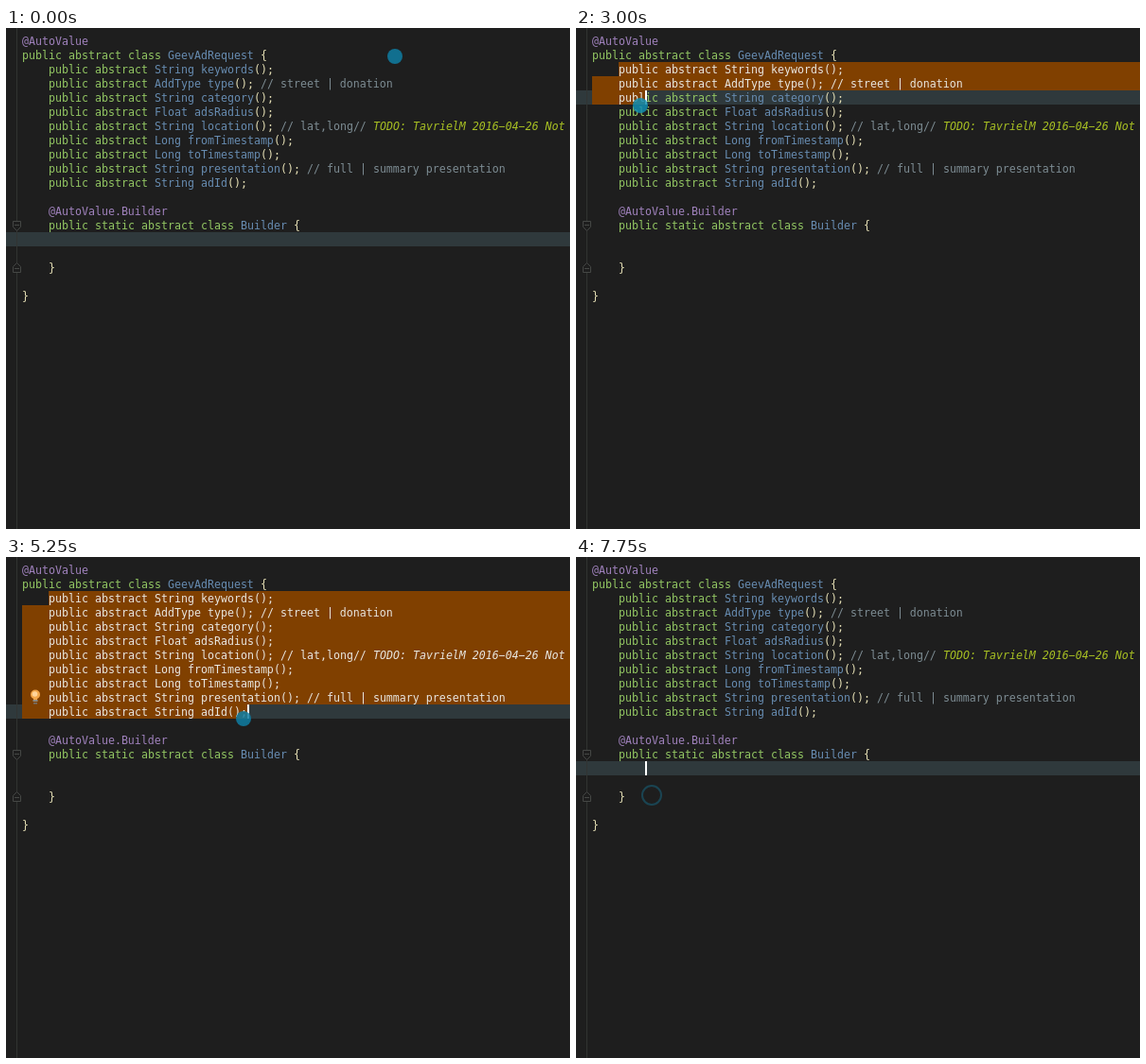
Animation of 596 by 530 pixels, one loop 8000 ms. Source, as an HTML page with a canvas:

```html
<!DOCTYPE html>
<html lang="en">
<head>
<meta charset="utf-8">
<title>Code selection</title>
<style>
  html, body { margin: 0; width: 100%; height: 100%; overflow: hidden; background: #1e1e1e; }
  canvas { display: block; }
</style>
</head>
<body>
<canvas id="stage" width="596" height="530"></canvas>
<script>
const ctx = document.getElementById('stage').getContext('2d');
const W = 596, H = 530, LOOP = 8000;
const LEFT = 17, TOP = 6, COL = 7, ROW = 15;
const SEL_ROW = 2, SEL_COL = 4;
const FONT = '11.627px "DejaVu Sans Mono", monospace';

const C = {
  bg: '#1e1e1e', line: '#2f393c', select: '#804000', chosen: '#e8e6e0',
  keyword: '#93c763', name: '#678cb1', note: '#a082bd', comment: '#7d8c93',
  todo: '#a8c023', punct: '#e8e2b7', gutter: '#323432', fold: '#454745'
};

const code = `@AutoValue
public abstract class GeevAdRequest {
    public abstract String keywords();
    public abstract AddType type(); // street | donation
    public abstract String category();
    public abstract Float adsRadius();
    public abstract String location(); // lat,long// TODO: TavrielM 2016−04−26 Not
    public abstract Long fromTimestamp();
    public abstract Long toTimestamp();
    public abstract String presentation(); // full | summary presentation
    public abstract String adId();

    @AutoValue.Builder
    public static abstract class Builder {


    }

}`.split('\n');

// time, x, y, look
const pointer = [
  [0, 411, 30, 'dot'], [250, 130, 26, 'dot'], [500, 7, 46, 'dot'],
  [750, 41, 63, 'dot'], [1000, 47, 52, 'dot'], [1250, 40, 45, 'dot'],
  [1750, 36, 65, 'ring'], [2500, 40, 28, 'dot'], [2750, 7, 59, 'drag'],
  [3000, 68, 82, 'drag'], [3250, 134, 145, 'drag'], [3500, 223, 169, 'drag'],
  [3750, 249, 171, 'dot'], [4000, 251, 171, 'dot'], [7000, 190, 197, 'dot'],
  [7250, 104, 232, 'dot'], [7500, 84, 232, 'dot'], [7750, 80, 252, 'ring']
];

// time, row, column, visible, selecting
const caret = [
  [0, 14, 8, 0, 0], [1750, 2, 4, 1, 0], [2750, 4, 0, 1, 1],
  [3000, 4, 8, 1, 1], [3250, 7, 17, 1, 1], [3500, 10, 29, 1, 1],
  [3750, 10, 33, 1, 1], [4000, 10, 34, 1, 1], [5750, 10, 34, 0, 1],
  [6250, 10, 34, 1, 1], [7250, 10, 34, 0, 1], [7750, 14, 8, 1, 0]
];

const colX = c => LEFT + c * COL;
const rowY = r => TOP + r * ROW;
const at = (track, t) => track.findLast(k => k[0] <= t);

function colorOf(token) {
  if (token.startsWith('TODO')) return C.todo;
  if (token.startsWith('//')) return C.comment;
  if (token[0] === '@') return C.note;
  if (/^(public|abstract|static|class)$/.test(token)) return C.keyword;
  return /^\w/.test(token) ? C.name : C.punct;
}

const pattern = /TODO.*|\/\/.*?(?=TODO|$)|@[\w.]+|\w+|[^\w\s]+/g;
const tokens = code.map(text => [...text.matchAll(pattern)].map(m => ({
  text: m[0], x: colX(m.index), color: colorOf(m[0]),
  font: m[0].startsWith('TODO') ? 'italic ' + FONT : FONT
})));

function box(color, x, y, w, h) {
  ctx.fillStyle = color;
  ctx.fillRect(x, y, w, h);
}

function drawRow(r, color) {
  for (const k of tokens[r]) {
    ctx.font = k.font;
    ctx.fillStyle = color || k.color;
    ctx.fillText(k.text, k.x, rowY(r) + 12);
  }
}

function drawSelection(row, col) {
  for (let r = SEL_ROW; r <= row; r++) {
    const x = r === SEL_ROW ? colX(SEL_COL) : LEFT;
    const w = (r === row ? colX(col) : W) - x;
    if (w <= 0) continue;
    ctx.save();
    ctx.beginPath();
    ctx.rect(x, rowY(r), w, ROW);
    ctx.clip();
    box(C.select, x, rowY(r), w, ROW);
    drawRow(r, C.chosen);
    ctx.restore();
  }
}

// dir 1 points down, -1 points up
function drawFold(y, dir) {
  ctx.beginPath();
  [[-4, -5], [4, -5], [4, 1], [0, 5], [-4, 1]].forEach(([dx, dy]) => ctx.lineTo(11.5 + dx, y + dy * dir));
  ctx.closePath();
  ctx.fillStyle = C.bg;
  ctx.fill();
  ctx.lineWidth = 1;
  ctx.strokeStyle = C.fold;
  ctx.stroke();
  box(C.fold, 9, y - 0.5 - dir, 5, 1);
}

function disc(color, x, y, r) {
  ctx.fillStyle = color;
  ctx.beginPath();
  ctx.arc(x, y, r, 0, 7);
  ctx.fill();
}

function drawBulb() {
  disc('#f2a74b', 31, 145.5, 5);
  box('#f2a74b', 29, 149, 4, 2);
  disc('#ffd59a', 30.5, 145, 2.8);
  box('#8d8981', 28.5, 151, 5, 2);
  box('#77736d', 29, 154, 4, 1.5);
}

function drawPointer(t) {
  const [start, x, y, look] = at(pointer, t);
  if (look === 'ring') {
    const step = Math.floor((t - start) / 250);
    ctx.strokeStyle = `rgba(24,100,126,${0.55 - step * 0.14})`;
    ctx.lineWidth = 2;
    ctx.beginPath();
    ctx.arc(x, y, 10, 0, 7);
    ctx.stroke();
  } else {
    disc(look === 'drag' ? 'rgba(18,142,178,.85)' : 'rgba(15,126,163,.85)', x, y, 8);
  }
}

function draw(t) {
  const [, row, col, visible, selecting] = at(caret, t);
  box(C.bg, 0, 0, W, H);
  box(C.line, 0, rowY(row), W, ROW);
  box(C.gutter, 11, 0, 1, H);
  drawFold(209.5, 1);
  drawFold(253.5, -1);
  tokens.forEach((_, r) => drawRow(r));
  if (selecting) drawSelection(row, col);
  if (t >= 5250 && t < 7750) drawBulb();
  if (visible) box('#fff', colX(col), rowY(row), 2, ROW);
  drawPointer(t);
}

const begin = performance.now();
function tick() {
  draw((performance.now() - begin) % LOOP);
  requestAnimationFrame(tick);
}
tick();
</script>
</body>
</html>
```
